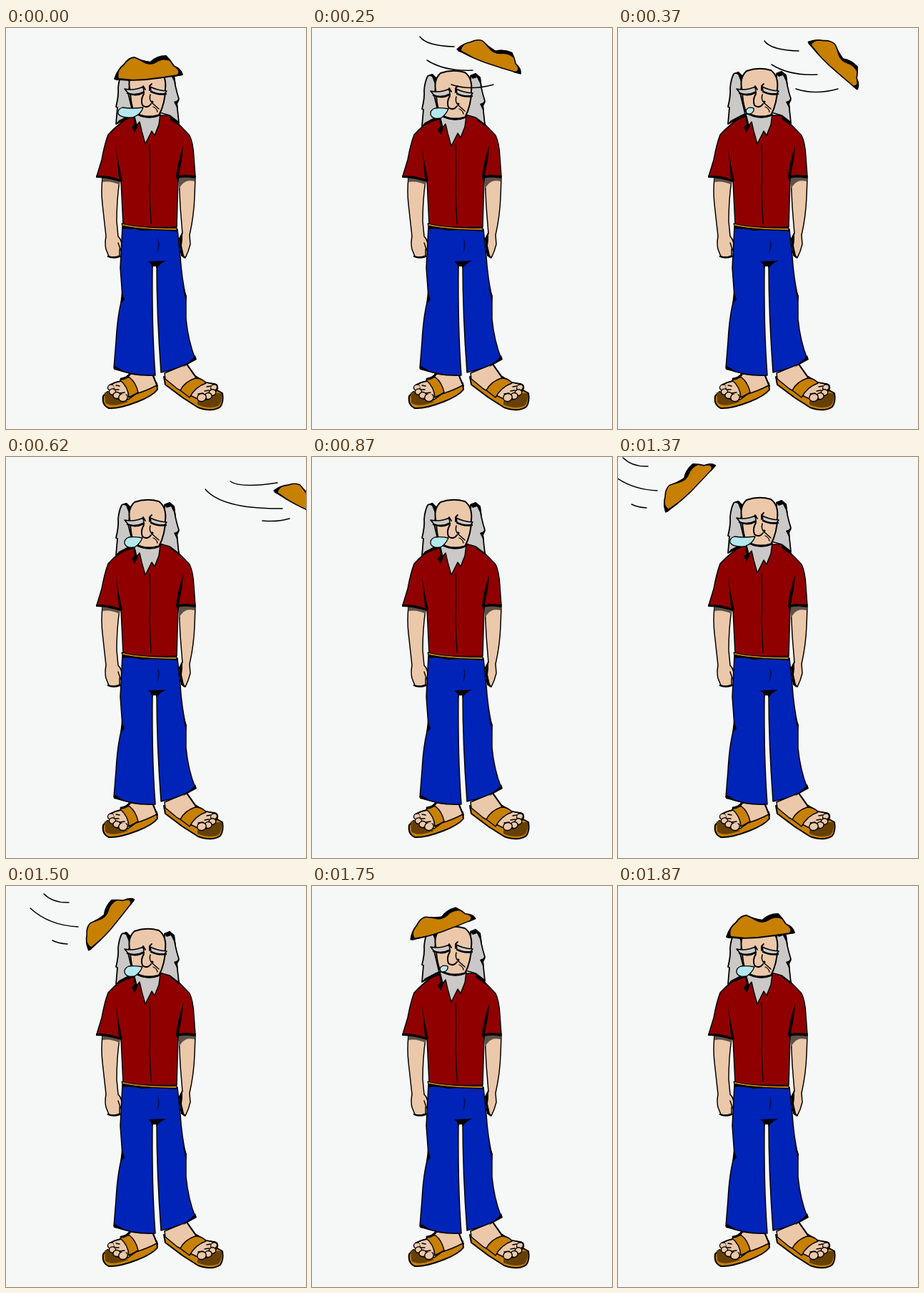
An HTML page with a canvas that plays this animation: 420x560 px, repeating every 2000 ms.

```html
<!DOCTYPE html>
<html lang="en">
<head>
<meta charset="utf-8">
<title>Hat in the wind</title>
<style>
html, body { margin: 0; width: 100%; height: 100%; overflow: hidden; background: #f6f8f8; }
canvas { display: block; width: 420px; height: 560px; }
</style>
</head>
<body>
<canvas id="stage" width="420" height="560"></canvas>
<script>
const ctx = document.getElementById('stage').getContext('2d');
const INK = '#000', PAPER = '#f6f8f8', SKIN = '#ebc8aa', HAIR = '#cbc9c7';
const GOLD = '#c88000', BROWN = '#654000', RED = '#900000', BLUE = '#0024b8', SHADE = '#5f5147';
const LOOP = 2000, STEP = 125;

function shape(d, fill, width = 1.5) {
  const path = new Path2D(d);
  if (fill) { ctx.fillStyle = fill; ctx.fill(path); }
  if (width) { ctx.strokeStyle = INK; ctx.lineWidth = width; ctx.stroke(path); }
}
const line = (d, width) => shape(d, null, width);
const blot = (d, color = INK) => shape(d, color, 0);

function drawArms() {
  shape('M135 209 Q133 228 135 246 L140 291 Q138 301 140 309 L144 319 Q151 322 159 318 L159 309 L163 308 Q163 297 157 291 L155 270 Q155 240 159 213 Z', SKIN);
  blot('M135 209 L160 212 L159 219 Q147 213 135 215 Z', SHADE);
  blot('M158 291 Q165 300 164 311 L160 312 L162 303 Z');
  line('M157 300 L160 309', 1.4);
  line('M143 319 Q150 322 159 319', 2.4);
  shape('M242 209 L244 250 L247 287 L243 294 L245 314 L251 321 L255 312 L258 302 L257 289 Q263 263 264 236 L265 209 Z', SKIN);
  blot('M242 208 L265 210 L264 214 Q252 211 246 219 L242 224 Z', SHADE);
  blot('M247 284 L242 294 L245 318 L250 322 L246 304 L247 296 Z');
}

function drawToes(toes) {
  for (const [x, y, r] of toes) {
    ctx.beginPath();
    ctx.ellipse(x, y, r * 1.15, r, -.25, 0, 7);
    ctx.fillStyle = SKIN;
    ctx.fill();
    ctx.strokeStyle = INK;
    ctx.lineWidth = 1.4;
    ctx.stroke();
  }
}

function drawFeet() {
  shape('M136 514 Q134 527 144 531 Q158 532 184 522 Q205 514 212 505 L211 496 L190 506 L160 514 L142 508 Z', GOLD, 2);
  blot('M138 509 L147 508 L160 516 L171 522 Q147 531 139 523 Z', BROWN);
  shape('M173 483 L206 485 L211 499 Q198 506 182 511 L171 519 Q158 521 152 515 L145 506 L145 499 L153 495 L163 492 Z', SKIN);
  drawToes([[147, 502, 4], [149, 508, 4], [155, 513, 4.5], [164, 516, 5.5]]);
  blot('M150 498 Q159 492 168 500 L171 511 L165 512 L153 506 Z', SKIN);
  line('M146 498 L153 495 L162 493 M154 499 L159 500 M152 505 L158 505 M159 510 L166 509', 1.4);
  shape('M160 492 Q164 487 173 488 Q182 495 185 509 L172 516 Q171 501 160 492 Z', GOLD);
  line('M173 484 Q168 490 161 490', 3);
  line('M206 486 L212 500', 2);

  shape('M221 487 L223 498 L247 516 L269 530 Q289 537 300 529 Q305 522 303 510 L296 506 L270 512 L240 497 Z', GOLD, 2);
  blot('M268 521 Q290 508 302 510 Q303 523 297 528 Q284 533 268 526 Z', BROWN);
  shape('M222 482 L253 469 L265 486 L280 495 L295 498 Q299 503 293 508 L284 518 Q273 521 266 517 L240 504 L223 490 Z', SKIN);
  drawToes([[291, 502, 4], [289, 509, 4.2], [283, 514, 4.5], [274, 516, 5.5]]);
  blot('M272 500 Q281 493 288 499 L283 507 L270 510 Z', SKIN);
  line('M280 495 L293 497 M281 501 L287 500 M278 507 L284 506 M269 511 L276 510', 1.4);
  shape('M244 506 Q250 494 265 489 Q275 489 280 496 Q265 501 257 516 Z', GOLD);
  line('M254 471 L266 488', 2);
}

function drawTrousers() {
  shape('M163 277 L160 335 L163 376 Q156 400 154 438 L151 475 Q179 487 209 485 Q204 420 205 331 L211 331 Q211 400 217 481 Q246 475 265 462 Q255 437 252 406 L252 376 Q246 350 244 319 L240 281 Z', BLUE);
  blot('M199 326 L224 325 Q214 330 211 336 L210 333 L206 333 L205 336 Q204 329 199 326 Z');
  blot('M212 293 Q218 304 211 315 Q214 304 212 293 Z', '#041052');
  blot('M162 368 L166 379 L160 386 Z');
  blot('M247 360 L253 374 L252 383 Z');
  blot('M151 471 L166 480 L179 484 L151 477 Z');
  blot('M265 457 L267 463 L247 474 L261 462 Z');
}

function drawShirt() {
  shape('M176 122 Q158 133 143 149 Q138 162 134 184 L127 207 Q144 207 161 213 L164 275 Q198 280 239 278 L241 207 Q251 205 265 208 L263 180 Q262 160 257 150 Q242 134 229 122 Z', RED);
  line('M201 163 Q202 200 201 230 L203 273', 1.3);
  blot('M154 166 Q157 187 163 214 L158 210 Z');
  blot('M248 164 Q247 184 243 199 L241 216 L238 208 Q240 188 248 164 Z');
  blot('M126 206 Q144 205 161 212 L161 215 Q142 209 126 209 Z');
  blot('M240 207 L249 205 L266 206 L265 210 Q253 207 240 210 Z');
  blot('M228 120 L242 131 L244 138 L230 128 Z');
  shape('M162 273 Q192 280 239 279 L239 282.5 Q192 282 163 276.5 Z', GOLD, 1.1);
  blot('M163 276 Q190 282 239 282 L239 284 Q205 281 190 283 Q174 279 163 281 Z');
}

const BUBBLES = {
  small: 'M190 112 Q181 109 179 116 Q180 122 187 119 Q191 116 190 112 Z',
  medium: 'M191 110 Q181 108 172 109 Q165 112 166 118 Q169 125 180 123 Q187 119 191 110 Z',
  large: 'M192 111 Q175 113 163 111 Q156 113 157 120 Q162 126 177 125 Q189 121 192 111 Z'
};

function drawHead(size) {
  ctx.save();
  ctx.translate(0, size === 'medium' ? 3 : 0);
  shape('M162 64 L168 62 L175 70 L171 91 L178 120 Q166 125 154 134 L156 111 L154 110 Q158 94 157 84 Q158 72 162 64 Z', HAIR, 1.8);
  shape('M222 64 L229 61 L235 66 Q236 80 242 99 L239 104 L242 132 L229 122 L215 118 L222 92 Z', HAIR, 1.8);
  blot('M162 63 L169 61 L176 68 L172 75 L168 65 Z');
  blot('M221 63 L229 60 L236 66 L238 80 L231 66 L225 68 Z');
  blot('M154 135 L158 129 L178 119 L180 124 L166 129 Z');
  blot('M235 103 L243 100 L240 106 L241 115 Z');
  blot('M177 119 L182 121 L184 138 L180 146 L176 139 L180 134 Z');
  shape('M179 120 L183 136 L187 131 L190 144 L195 162 L204 144 L208 150 L214 135 L216 120 Z', HAIR, 1.5);
  shape('M174 88 Q169 70 180 60 Q197 54 214 59 Q225 67 223 85 Q223 105 214 122 Q203 127 190 123 L179 117 Q174 103 174 88 Z', SKIN, 2);
  line('M181 119 Q195 127 213 122', 2.8);
  shape('M166 85 Q179 88 192 82 L193 89 Q182 95 171 91 Z', HAIR, 1.5);
  shape('M202 82 Q211 87 225 88 L222 92 Q209 92 203 88 Z', HAIR, 1.5);
  line('M170 91 Q182 96 193 90 M203 89 Q213 94 224 92', 2.4);
  line('M192 81 L195 86 M201 87 L201 81 L204 78', 1.8);
  line('M193 92 Q188 100 191 108 Q198 113 203 106', 2);
  line('M202 93 Q200 100 204 104 M205 105 L214 113', 1.5);
  line('M206 110 Q211 112 212 117', 1.3);
  blot('M204 101 L207 103 L204 106 Z');
  shape(BUBBLES[size], '#b4e8ee', 1.3);
  ctx.restore();
}

// The crown is pressed down by the wind while the hat is off the head.
function drawHat(x, y, degrees) {
  ctx.save();
  ctx.translate(x, y);
  ctx.rotate(degrees * Math.PI / 180);
  ctx.scale(1, degrees ? .84 : 1);
  ctx.translate(-200, -68);
  shape('M152 71 Q157 57 165 51 Q172 41 180 41 Q190 46 202 48 Q211 39 224 39 Q231 46 235 53 Q245 57 247 65 Q222 69 196 72 Q170 74 152 71 Z', GOLD, 1.8);
  blot('M178 40 Q191 46 202 47 Q212 38 225 39 L230 46 Q219 42 211 48 Q202 54 192 48 Z');
  blot('M235 53 Q246 56 247 66 L236 68 Q244 63 240 58 Z');
  blot('M152 71 Q154 61 160 56 Q156 65 158 70 L178 72 L154 73 Z');
  ctx.restore();
}

// Each streak: start, control and end point.
const GUST_NEAR = [[205, 18, 214, 31, 253, 32], [215, 51, 240, 67, 279, 65], [249, 85, 276, 94, 308, 85]];
const GUST_FAR = [[314, 34, 328, 44, 380, 36], [279, 45, 303, 73, 387, 72], [359, 89, 380, 91, 397, 86]];
const GUST_BACK = [[53, 11, 66, 24, 88, 23], [34, 31, 60, 55, 101, 57], [65, 76, 72, 80, 86, 81]];
const GUST_MID = GUST_NEAR.map((s, i) => s.map((v, j) => (v + GUST_FAR[i][j]) / 2));

function drawGust(streaks, dx = 0, dy = 0) {
  ctx.save();
  ctx.translate(dx, dy);
  for (const [a, b, c, d, e, f] of streaks) line(`M${a} ${b} Q${c} ${d} ${e} ${f}`, 1.5);
  ctx.restore();
}

// Hat pose per step: brim centre, rotation, then optional streaks and their offset.
const REST = [200, 68, 0];
const FLIGHT = {
  0: REST, 1: REST,
  2: [248, 47, 24, GUST_NEAR, -54, -6],
  3: [301, 53, 47, GUST_NEAR],
  4: [360, 58, 39, GUST_MID],
  5: [418, 69, 30, GUST_FAR],
  9: [7, 62, -25],
  10: [55, 52, -33, GUST_BACK, -93, -2],
  11: [102, 44, -40, GUST_BACK, -46, -10],
  12: [148, 54, -45, GUST_BACK],
  13: [166, 54, -30, GUST_BACK, 18, 0],
  14: [184, 60, -15],
  15: REST
};
const BREATH = ['large', 'medium', 'small', 'small', 'medium'];

function stepAt(ms) {
  const i = Math.floor(ms / STEP);
  // Step times are cut to whole hundredths of a second.
  return ms >= Math.floor((i + 1) * STEP / 10) * 10 ? (i + 1) % 16 : i;
}

function draw(step) {
  ctx.fillStyle = PAPER;
  ctx.fillRect(0, 0, 420, 560);
  ctx.lineJoin = ctx.lineCap = 'round';
  drawArms();
  drawFeet();
  drawTrousers();
  drawShirt();
  drawHead(step ? BREATH[(step + 4) % 5] : 'large');
  const pose = FLIGHT[step];
  if (!pose) return;
  const [x, y, degrees, gust, dx, dy] = pose;
  if (gust) drawGust(gust, dx, dy);
  drawHat(x, y, degrees);
}

const start = performance.now();
function tick() {
  draw(stepAt((performance.now() - start) % LOOP));
  requestAnimationFrame(tick);
}
tick();
</script>
</body>
</html>
```
